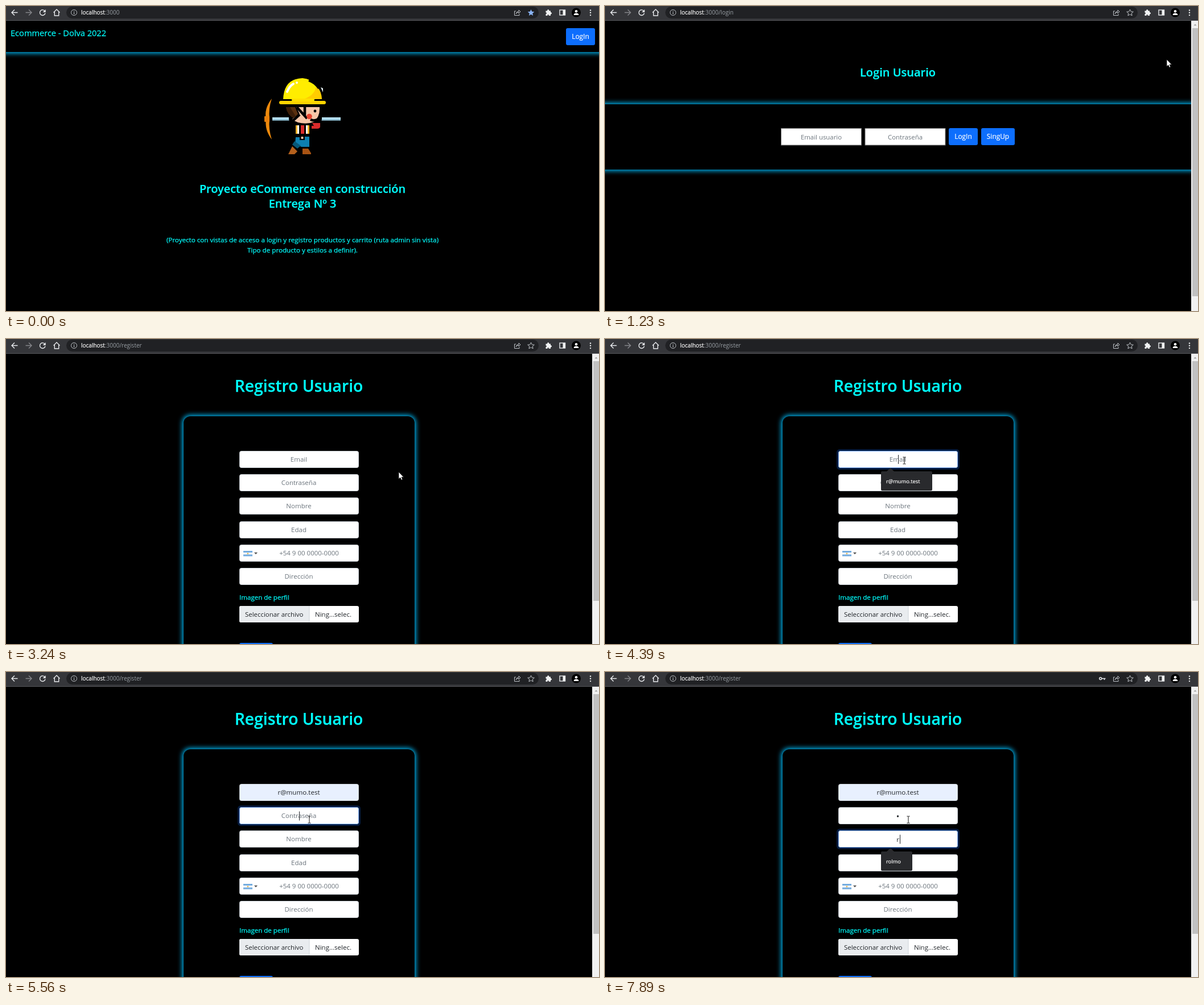
Recreate the animation shown at these times as an HTML page. Size 1042 by 537 pixels, loop 8000 ms.

```html
<!DOCTYPE html>
<html lang="es">
<head>
<meta charset="utf-8">
<title>Registro</title>
<style>
html, body { margin: 0; width: 100%; height: 100%; overflow: hidden; background: #000; }
svg { display: block; }
text { font-family: "Open Sans", "Noto Sans", sans-serif; fill: #212529; white-space: pre; }
.cyan { fill: #0ff; stroke: #0ff; stroke-width: .25; }
.white { fill: #fff; stroke: #fff; stroke-width: .2; }
.bold { font-weight: 600; }
.mid { text-anchor: middle; }
.hint { fill: #6c757d; }
.btn { fill: #0d6efd; }
.btn.on { fill: #0b5ed7; }
.line { fill: none; stroke: #e8eaed; stroke-width: 1.4; }
</style>
</head>
<body>
<svg id="stage" width="1042" height="537" viewBox="0 0 1042 537"></svg>
<script>
const LOOP = 8000, STEP = 70;
const $ = id => document.getElementById(id);

const text = (x, y, s, size, cls = '', more = '') =>
  `<text x="${x}" y="${y}" class="${cls}" style="font-size:${size}px" ${more}>${s}</text>`;
const title = (x, y, s, size) => text(x, y, s, size, 'cyan bold mid');
const box = (x, y, w, h, fill, r = 0, more = '') =>
  `<rect x="${x}" y="${y}" width="${w}" height="${h}" rx="${r}" fill="${fill}" ${more}/>`;
const path = (d, fill, more = '') => `<path d="${d}" fill="${fill}" ${more}/>`;
const dot = (x, y, r, fill, more = '') => `<circle cx="${x}" cy="${y}" r="${r}" fill="${fill}" ${more}/>`;
const scene = (id, body) => `<g id="${id}">${body}</g>`;
const button = (id, x, y, w, h, s) =>
  box(x, y, w, h, '', 3, `id="${id}" class="btn"`) +
  text(x + w / 2, y + h / 2 + 4.3, s, 11.9, 'white mid');
const glowBox = (x, y, w, h, r = 0) =>
  box(x - 2, y - 2, w + 4, h + 4, '#00bfff', r && r + 2, 'filter="url(#glow)"') +
  box(x, y, w, h, '#000', r);
const scrollbar = bottom =>
  box(1030, 26, 12, 511, '#f1f1f1') + box(1032, 39, 10, bottom - 39, '#c1c1c1') +
  path('M1034.5 34.5h5l-2.5 -3z', '#a3a3a3');
const caret = (id, x, y) => box(x, y - 8, 1, 16, '#212529', 0, `id="${id}"`);
const popup = (id, y, w, s) => `<g id="${id}">` +
  path(`M495 ${y}l6.5 -6l6.5 6z`, '#292a2d') + box(485, y, w, 34, '#292a2d', 2) +
  text(494, y + 20.5, s, 9.3, 'white') + '</g>';

function worker() {
  const stripe = (x, w, fill) => box(x, 210, w, 15, fill);
  return path('M467 163Q453 181 457 199Q454 218 467 235Q461 216 463 199Q461 181 467 163Z', '#ee8a0c') +
    box(454, 194, 9, 10, '#e87f0a', 1) +
    box(468, 196, 120, 5.5, '#b5dff0') + box(468, 199.5, 120, 2, '#8cbfd6') +
    box(497, 176, 58, 31, '#000', 8) +
    path('M492 178H508L513 190L506 198Q494 191 492 178Z', '#5a300f') +
    path('M492 178H499L509 194L506 198Q494 191 492 178Z', '#3a1d08') +
    path('M510 178H551Q552 195 541 204Q528 209 513 205Q505 202 503 199L516 190Z', '#f6c5a7') +
    path('M511 178L529 198M525 178V192M503 203L516 191M535 200Q542 204 552 197', 'none', 'stroke="#000" stroke-width="4.5"') +
    dot(533, 194.5, 4.8, '#e8432f') + dot(543, 185, 2.4, '#000') +
    path('M487 165Q488 128 521 127Q551 130 555 165Z', '#ffed00') +
    path('M545 141Q555 150 555 165H518Q542 160 545 141Z', '#ffcc00') +
    path('M532 131Q542 134 550 145', 'none', 'stroke="#000" stroke-width="4"') +
    path('M553 143L557 145V152Z', '#e8f4f8') +
    path('M494 151Q498 141 505 137', 'none', 'stroke="#fff" stroke-width="4" stroke-linecap="round"') +
    dot(511, 135, 2, '#fff') +
    box(480, 167, 82, 6, '#ffd400', 3) + box(501, 163, 42, 5, '#ffdf00') +
    path('M484 165.5H501M543 165.5H559', 'none', 'stroke="#000" stroke-width="3" stroke-linecap="round"') +
    path('M538 206H552V213Q551 216 547 216H537V211H541Z', '#d92b2b') +
    stripe(509, 3, '#ffb229') + stripe(512, 3, '#fff') + stripe(518, 6, '#d92b2b') +
    stripe(527, 3, '#fff') + stripe(530, 3, '#ffb229') +
    path('M509 231H516V236H525V230H533V248H519L508 243Z', '#0d7fb0') +
    box(516, 225, 9, 11, '#000', 3) + box(518.5, 230, 4, 4, '#f6c5a7', 1) +
    path('M507 238L518 246L512 251L503 244Z', '#075878') +
    path('M503 247L512 256L507 261H496Z', '#b4601c') +
    path('M521 251H531L536 259V261H521Z', '#a85313');
}

const labels = { mail: 'Email', pass: 'Contraseña', name: 'Nombre', age: 'Edad',
  phone: '+54 9 00 0000-0000', addr: 'Dirección' };
function field([id, label], i) {
  const y = Math.floor(197.3 + 41.25 * i);
  const edge = color => `stroke="${color}"`;
  return box(410.5, y + .5, 209, 29, '#fff', 3, `id="${id}Box" ${edge('#ced4da')}`) +
    scene(id + 'Ring', box(408.5, y - 1.5, 213, 33, 'none', 4, edge('#0d6efd') + ' stroke-width="3" stroke-opacity=".25"') +
      box(410.5, y + .5, 209, 29, 'none', 3, edge('#86b7fe'))) +
    text(id == 'phone' ? 532.5 : 514.5, y + 19.1, label, 11.5, 'hint mid', `id="${id}Hint"`);
}

const home = glowBox(-20, 26, 1082, 55) +
  text(8, 53, 'Ecommerce - Dolva 2022', 14.6, 'cyan') +
  button('homeBtn', 984, 39, 51, 30, 'LogIn') + worker() +
  title(521, 329, 'Proyecto eCommerce en construcción', 19.9) +
  title(521, 355, 'Entrega Nº 3', 19.9) +
  text(521, 415.5, '(Proyecto con vistas de acceso a login y registro productos y carrito (ruta admin sin vista)', 11.65, 'cyan mid') +
  text(521, 433.5, 'Tipo de producto y estilos a definir).', 11.65, 'cyan mid');

const input = (x, s) => box(x, 215.5, 141, 29.5, '#fff', 0, 'stroke="#767676"') +
  text(x + 70.5, 234.6, s, 11.4, 'hint mid');
const login = glowBox(-20, 173, 1082, 115) + title(514.5, 123.5, 'Login Usuario', 20) +
  input(309.5, 'Email usuario') + input(457, 'Contraseña') +
  button('logBtn', 604, 215, 51, 30, 'LogIn') + button('signBtn', 661, 215, 59, 30, 'SingUp') +
  scrollbar(511);

const register = title(514.5, 93, 'Registro Usuario', 28.3) +
  glowBox(312, 136, 406, 460, 12) + Object.entries(labels).map(field).join('') +
  box(417, 373, 16, 9.5, '#74acdf') + box(417, 376, 16, 3.4, '#fff') + dot(425, 377.7, 1.2, '#d9a93a') +
  path('M436 375.8h6l-3 3.4z', '#555') +
  text(514.5, 216.3, 'r@mumo.test', 11.6, 'mid', 'id="mailText"') +
  dot(514.5, 254, 1.7, '#212529', 'id="passText"') +
  text(514.5, 298.9, 'r', 11.6, 'mid', 'id="nameText"') +
  caret('mailCaret', 515, 212) + caret('passCaret', 515, 253.5) + caret('nameCaret', 515, 294.5) +
  text(410, 459, 'Imagen de perfil', 11.55, 'cyan') +
  box(410, 470, 210, 29, '#fff', 3) +
  path('M413 470H533V499H413Q410 499 410 496V473Q410 470 413 470Z', '#e9ecef') +
  box(532.5, 470, 1, 29, '#ced4da') +
  text(420, 488.7, 'Seleccionar archivo', 11.45) + text(543, 488.7, 'Ning...selec.', 11.5) +
  box(410, 535, 59, 30, '#0d6efd', 3) +
  popup('mailPop', 233, 90, 'r@mumo.test') + popup('namePop', 316, 55, 'rolmo') +
  scrollbar(461);

const star = 'M922.5 6l1.7 3.8 4.1.4-3.1 2.7.9 4-3.6-2.1-3.6 2.1.9-4-3.1-2.7 4.1-.4z';
const bar = box(0, 0, 1042, 26, '#35363a') + box(0, 25, 1042, 1, '#55565a') +
  box(106, 1, 830, 21, '#202124', 10.5) +
  path('M20.5 11.5H10.5M15 6.5L10 11.5L15 16.5', 'none', 'class="line"') +
  path('M34.5 11.5H44.5M40 6.5L45 11.5L40 16.5', 'none', 'style="stroke:#85868a" class="line"') +
  path('M68.3 9A4.8 4.8 0 1 0 69 12.5', 'none', 'class="line"') + path('M69.7 6V11H64.7Z', '#e8eaed') +
  path('M83.5 11.5L89 6L94.5 11.5M85.3 10.5V17H92.7V10.5', 'none', 'class="line"') +
  dot(119.5, 11.5, 5, 'none', 'stroke="#bdc1c6"') +
  box(119, 10.8, 1.1, 3.7, '#bdc1c6') + box(119, 8.5, 1.1, 1.3, '#bdc1c6') +
  text(132, 15.2, 'localhost<tspan id="url" fill="#9aa0a6" stroke="none"></tspan>', 10, 'white') +
  scene('key', path('M873 11.5H879.5M877.5 11.5V14', 'none', 'class="line"') + dot(870.7, 11.5, 2, 'none', 'class="line"')) +
  path('M896 9H893.5V16.5H902V14M896 13.5Q897 9.5 901 9.5V7L904 10L901 13V11Q898 11 896 13.5Z', 'none', 'stroke="#bdc1c6"') +
  path(star, 'none', 'id="star"') +
  path('M948.5 8.5H951Q951 6 952.7 6T954.4 8.5H957V11Q959 11 959 12.7T957 14.4V17H953.8Q953.8 15 952.6 15T951.4 17H948.5V14Q950 14 950 12.7T948.5 11.4Z', '#f1f3f4') +
  box(973, 7, 9.5, 9, 'none', 0, 'class="line"') + box(978.5, 7, 4, 9, '#f1f3f4') +
  dot(1002, 11.5, 8, '#000') + dot(1002, 9.3, 2.3, '#fff') + path('M997.5 16Q998 12.6 1002 12.6T1006.5 16Z', '#fff') +
  [7.5, 11.8, 16.1].map(y => dot(1027, y, 1.2, '#f1f3f4')).join('');

const cursors = scene('arrow', path('M0 0V12.5L2.8 10L4.7 14.3L6.8 13.4L5 9.2H8.8Z', '#fff', 'stroke="#000" stroke-width=".7"')) +
  scene('hand', path('M-1 0.8Q0 -.8 1.3 .8V6L7 7.5Q8.3 8 8 10L7.2 13.5V16H.3V14L-3.6 9Q-3.6 7.4 -2.2 8L-1 9.2Z', '#fff', 'stroke="#000" stroke-width=".7"') +
    path('M2.2 12V14.5M4.2 12V14.5', 'none', 'stroke="#555" stroke-width=".6"')) +
  scene('beam', path('M-2.5 -6H-.7L0 -5.4L.7 -6H2.5M0 -5.4V5.4M-2.5 6H-.7L0 5.4L.7 6H2.5', 'none', 'stroke="#111" stroke-width="1"'));

$('stage').innerHTML =
  `<defs><filter id="glow" filterUnits="userSpaceOnUse" x="-40" y="0" width="1122" height="640"><feGaussianBlur stdDeviation="4"/></filter></defs>` +
  box(0, 0, 1042, 537, '#000') + scene('home', home) + scene('login', login) +
  scene('register', register) + bar + scene('cursor', cursors);

// Pointer path: time, x, y
const track = [[170, 1029, 511], [450, 1017, 300], [730, 997, 92], [870, 992, 57], [1020, 992, 58],
  [1230, 987, 94], [1510, 899, 185], [1790, 776, 271], [1860, 762, 270], [2070, 717, 256], [2240, 692, 242],
  [2490, 692, 242], [2630, 690, 234], [3240, 690, 234], [3520, 588, 221], [3790, 526, 214], [4390, 526, 214],
  [4600, 530, 248], [4740, 531, 262], [5089, 531, 262], [5090, 533, 260], [LOOP, 533, 260]];
const bursts = [0, 170, 1020, 1860, 3030, 3920, 4390, 5220, 5960, 6360, 6890, 7360, 7890];

const clamp = v => Math.max(0, Math.min(1, v));
const show = (id, on) => $(id).style.display = on ? '' : 'none';
const fade = (id, v) => $(id).style.opacity = v;
const within = (t, a, b) => t >= a && t < b;

function pointer(t) {
  const i = Math.max(1, track.findIndex(k => k[0] > t));
  const [a, ax, ay] = track[i - 1], [b, bx, by] = track[i];
  const p = clamp((t - a) / (b - a));
  return [ax + (bx - ax) * p, ay + (by - ay) * p];
}

function draw(now) {
  const start = bursts.filter(b => b <= now).pop();
  const t = start + Math.floor((now - start) / STEP) * STEP;
  const page = t < 1020 ? 'home' : t < 3030 ? 'login' : 'register';
  for (const id of ['home', 'login', 'register']) show(id, id == page);
  $('url').textContent = ':3000' + (page == 'home' ? '' : '/' + page);
  $('star').setAttribute('style', page == 'home' ? 'fill:#8ab4f8' : 'stroke:#bdc1c6');
  show('key', t >= 6360);

  const [x, y] = pointer(t);
  const over = (l, top, r, b) => x >= l && x <= r && y >= top && y <= b;
  const onHome = page == 'home' && over(984, 39, 1035, 69);
  const onSign = page == 'login' && over(661, 215, 720, 245);
  const onField = page == 'register' && (over(410, 197, 620, 227) || t >= 5090);
  $('homeBtn').classList.toggle('on', onHome);
  $('signBtn').classList.toggle('on', onSign);
  show('cursor', t >= 170);
  $('cursor').setAttribute('transform', `translate(${x.toFixed(1)} ${y.toFixed(1)})`);
  show('hand', onHome || onSign);
  show('beam', onField);
  show('arrow', !onHome && !onSign && !onField);

  // Focus rings ease in and out; each focus begins at the given time
  const ramp = at => clamp((t - at + STEP) / (3 * STEP));
  const focus = [ramp(3920), ramp(5220), ramp(7360)];
  fade('mailRing', focus[0] - focus[1]);
  fade('passRing', focus[1] - focus[2]);
  fade('nameRing', focus[2]);
  for (const id of ['age', 'phone', 'addr']) fade(id + 'Ring', 0);

  const filled = t >= 4530;
  $('mailBox').setAttribute('fill', filled ? '#e8f0fe' : '#fff');
  show('mailHint', !filled);
  show('mailText', filled);
  show('mailPop', within(t, 3920, 5090));
  fade('mailPop', t < 4390 ? ramp(3920) : t < 4880 ? 1 : clamp((5090 - t) / 420));
  show('mailCaret', within(t, 3920, 4530) || within(t, 4880, 5220));
  $('mailCaret').setAttribute('x', filled ? 552 : 515);

  const secret = t >= 6360;
  show('passHint', !secret);
  show('passText', secret);
  show('passCaret', within(t, 5220, 5960) || within(t, 6360, 6890));
  $('passCaret').setAttribute('x', secret ? 517 : 515);

  const named = t >= 7890;
  show('nameHint', !named);
  show('nameText', named);
  show('namePop', named);
  show('nameCaret', t >= 7360);
  $('nameCaret').setAttribute('x', named ? 518 : 515);
}

function tick() {
  draw(performance.now() % LOOP);
  requestAnimationFrame(tick);
}
tick();
</script>
</body>
</html>
```
